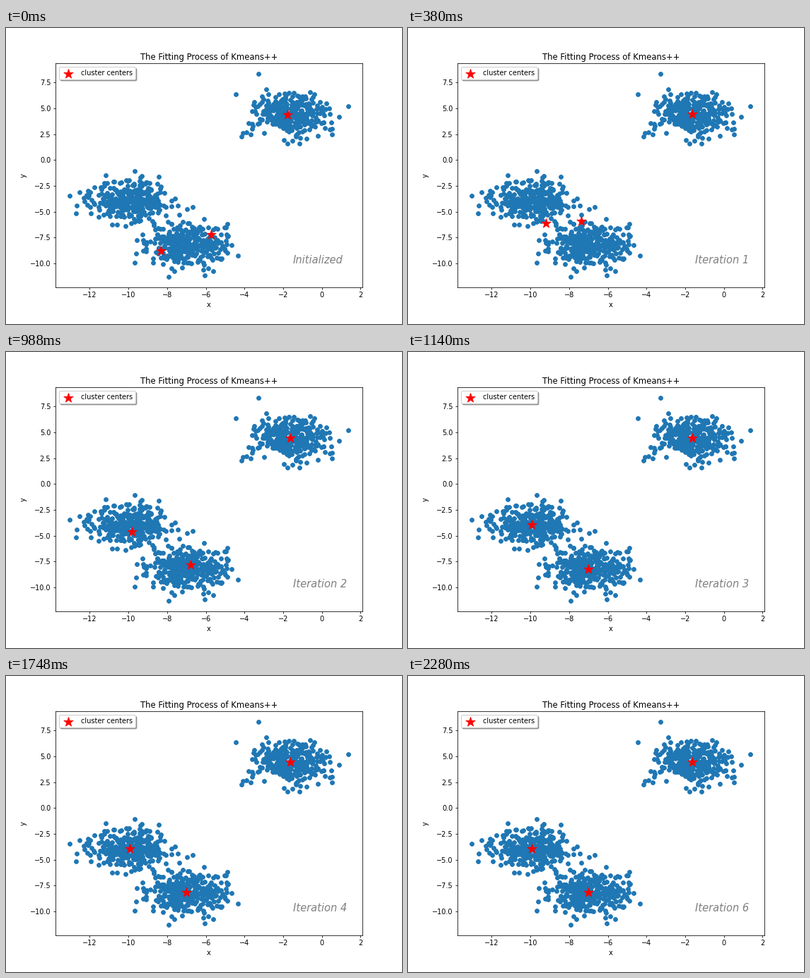
Write a matplotlib script that moves like this. It is 560 by 420 pixels and loops after 2660 ms.

```python
import numpy as np
import matplotlib.pyplot as plt
from matplotlib.animation import FuncAnimation

STEPS = 7
STEP_MS = 380


def make_blobs(sizes, seed):
    """Gaussian blobs of unit spread around random centers in [-10, 10]."""
    rng = np.random.RandomState(seed)
    means = rng.uniform(-10, 10, (len(sizes), 2))
    return np.vstack([rng.normal(m, 1.0, (n, 2)) for m, n in zip(means, sizes)])


def nearest(points, targets):
    """Index of the closest target for every point."""
    gaps = points[:, None, :] - targets[None, :, :]
    return (gaps ** 2).sum(axis=2).argmin(axis=1)


def fit(points, centers, steps):
    """Centers after each of the given number of Lloyd steps."""
    history = [centers]
    for _ in range(steps - 1):
        labels = nearest(points, centers)
        centers = np.array([points[labels == k].mean(axis=0)
                            for k in range(len(centers))])
        history.append(centers)
    return history


points = make_blobs([334, 333, 333], seed=1)
guess = np.array([[-1.78, 4.37], [-8.33, -8.76], [-5.72, -7.20]])
seeds = points[nearest(guess, points)]
history = fit(points, seeds, STEPS)

fig, ax = plt.subplots(figsize=(8, 6), dpi=70)
fig.subplots_adjust(left=0.125, right=0.9, bottom=0.125, top=0.88)

ax.scatter(points[:, 0], points[:, 1], c="#1f77b4")
stars = ax.scatter(seeds[:, 0], seeds[:, 1], s=200, c="red", marker="*",
                   label="cluster centers")
note = ax.text(-1.5, -10, "", style="italic", size=15, color="gray")

ax.set_title("The Fitting Process of Kmeans++")
ax.set_xlabel("x")
ax.set_ylabel("y")
ax.set_xticks(np.arange(-12, 3, 2))
ax.set_yticks(np.arange(-10, 8, 2.5))
ax.legend(loc="upper left", shadow=True)


def draw(step):
    stars.set_offsets(history[step])
    note.set_text(f"Iteration {step}" if step else "Initialized")
    return stars, note


anim = FuncAnimation(fig, draw, frames=STEPS, interval=STEP_MS,
                     repeat=True, repeat_delay=0)
plt.show()
```
